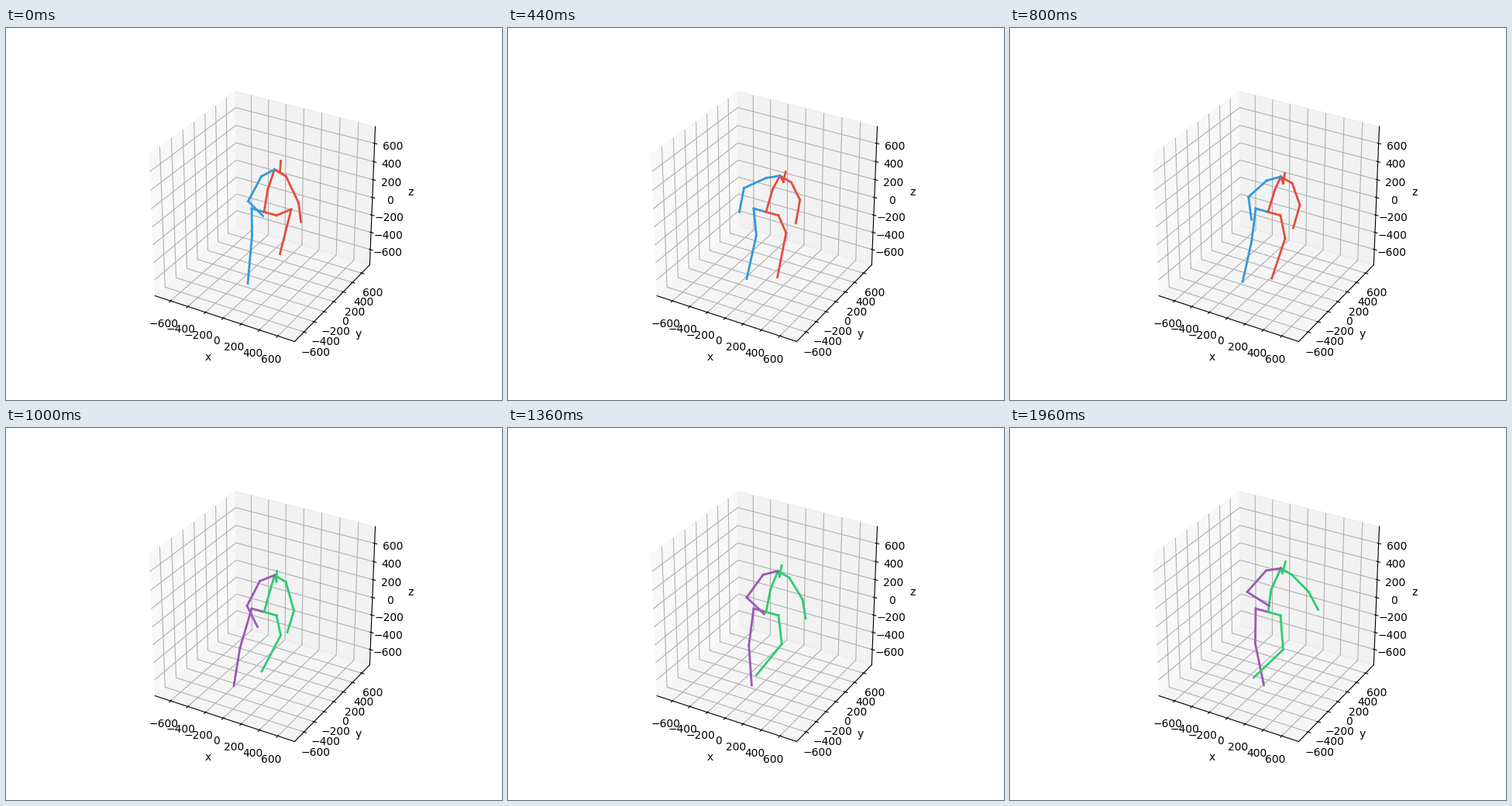
Recreate the animation shown at these times as a matplotlib script. Size 640 px wide and 480 px high, loop 2000 ms.

```python
import numpy as np
import matplotlib.pyplot as plt
from matplotlib.animation import FuncAnimation

FRAMES, STEP = 50, 40
REACH, SWITCH = 15, 25  # end of the arm swing; the colours change
COLORS = [("#e74c3c", "#3498db"), ("#2ecc71", "#9b59b6")]  # (right, left)
RIGHT, LEFT = 0, 1


def ease_out(s, power):
    return 1 - (1 - s) ** power


def path(start, reach, step, rest, swing=1):
    """Start to reach, swing over into the step, then settle to rest."""
    poses = np.array([start, reach, step, rest], float)
    t = np.arange(FRAMES)[:, None]
    a = ease_out(np.clip(t / REACH, 0, 1), swing)
    b = np.clip((t - REACH) / (SWITCH - REACH), 0, 1)
    b = b * b * (3 - 2 * b)
    c = ease_out(np.clip((t - SWITCH) / (FRAMES - 1 - SWITCH), 0, 1), 2)
    moves = np.diff(poses, axis=0)
    return poses[0] + a * moves[0] + b * moves[1] + c * moves[2]


# Joints in stage pixels, y pointing down
root = np.tile([332.5, 236.9], (FRAMES, 1))
hip = np.array([16, 4.4])
l_hip, r_hip = root - hip, root + hip
l_knee = path((317, 267), (321, 267), (301.5, 283), (316, 278))
l_ankle = path((311.5, 329), (306, 321), (293.5, 332), (327, 331))
r_knee = path((367.5, 233.5), (355, 275), (354, 267), (352, 285.5))
r_ankle = path((353, 291), (345, 332), (329.5, 313.5), (314, 321.5))

neck = path((346, 182), (352, 193), (346, 189.5), (349, 180.5))
stoop = neck[:, 1] - 180
spine = np.column_stack([336.3 + 0.45 * stoop, np.full(FRAMES, 208)])
chin = neck + path((7, 4), (3.5, 9.5), (2.5, 8), (2, 6.5))
head = neck + path((8, -11), (7, -3), (3, -5.5), (6, -8.5))

r_shoulder = neck + [14.7, 8.8]
r_elbow = path((377, 225), (376, 220), (371, 235.5), (385, 211))
r_wrist = path((380, 249.5), (367.5, 252), (362.5, 263), (397, 234))
l_shoulder = neck + path((-17, 9), (-18, 3), (-19, 7.5), (-19, 3), swing=5)
l_elbow = path((312, 223), (304, 206), (310.5, 229), (305.5, 211), swing=5)
l_wrist = path((331, 242), (298, 237), (324, 256), (334, 229), swing=5)

CHAINS = [
    (LEFT, [root, l_hip, l_knee, l_ankle]),
    (RIGHT, [root, r_hip, r_knee, r_ankle]),
    (RIGHT, [root, spine, neck, chin, head]),
    (RIGHT, [neck, r_shoulder, r_elbow, r_wrist]),
    (LEFT, [neck, l_shoulder, l_elbow, l_wrist]),
]
BONES = [(side, a, b) for side, c in CHAINS for a, b in zip(c, c[1:])]

fig = plt.figure(figsize=(6.4, 4.8), dpi=100)

# Cube of +-750 with a small margin on every side
box = fig.add_subplot(projection="3d")
lim = 750 * 25 / 24
ticks = range(-600, 601, 200)
box.set(xlim=(-lim, lim), ylim=(-lim, lim), zlim=(-lim, lim),
        xticks=ticks, yticks=ticks, zticks=ticks,
        xlabel="x", ylabel="y", zlabel="z")
box.set_box_aspect((1, 1, 1), zoom=3 ** 0.5 / 1.8294640721620434)
box.view_init(elev=30, azim=-60)

# Whole-stage axes where integers fall on pixel centres
stage = fig.add_axes([0, 0, 1, 1])
stage.set(xlim=(-0.5, 639.5), ylim=(479.5, -0.5))
stage.axis("off")
lines = [stage.plot([], [], lw=2)[0] for _ in BONES]


def update(i):
    palette = COLORS[int(i >= SWITCH)]
    for line, (side, a, b) in zip(lines, BONES):
        line.set_data(*zip(a[i], b[i]))
        line.set_color(palette[side])
    return lines


anim = FuncAnimation(fig, update, frames=FRAMES, interval=STEP, repeat=True)
plt.show()
```
